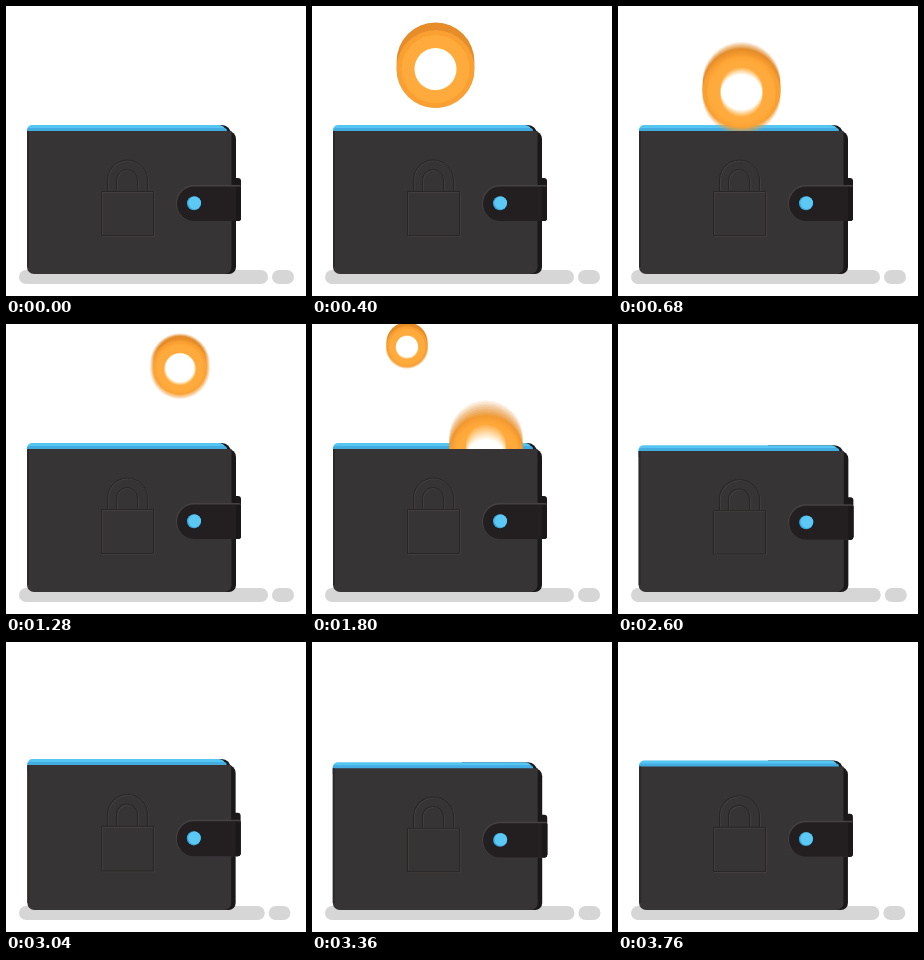
Recreate the animation shown at these times as an HTML page with a canvas. Size 300 by 290 pixels, loop 3.8 s.

```html
<!DOCTYPE html>
<html lang="en">
<head>
<meta charset="utf-8">
<title>Coins into wallet</title>
<style>
html, body { margin: 0; width: 100%; height: 100%; overflow: hidden; background: #fff; }
canvas { display: block; }
</style>
</head>
<body>
<canvas id="stage" width="300" height="290"></canvas>
<script>
const LOOP = 3800, STEP = 40;
const ctx = document.getElementById('stage').getContext('2d');
const layer = document.createElement('canvas');
layer.width = 300;
layer.height = 290;
const lctx = layer.getContext('2d');

// Each coin pops in at `start`, hovers at `y`, then drops `drop` px in `pace` ms after `fall`.
const coins = [
  { x: 123.5, y: 63, r: 39, start: 20, grow: 400, fall: 363, drop: 23, pace: 317 },
  { x: 174, y: 48, r: 37, start: 1060, grow: 400, fall: 1278, drop: 80, pace: 522 },
  { x: 95, y: 22, r: 21, start: 1620, grow: 200, fall: 1674, drop: 40, pace: 526 }
];
const impacts = [{ at: 1960, size: 6 }, { at: 2500, size: 3 }];

function coinPose(c, t) {
  const p = Math.min(1, Math.max(0, (t - c.start) / c.grow));
  const scale = Math.sin(p * Math.PI / 2);
  const fallen = c.drop * Math.pow(Math.max(0, t - c.fall) / c.pace, 2.5);
  return { r: c.r * scale, y: c.y - 15 * (1 - scale) + fallen };
}

function squash(t) {
  return impacts.reduce((sum, { at, size }) => {
    const d = t - at;
    return d < 0 ? sum : sum + size * Math.exp(-d / 640) * Math.sin(d / 640 * 2 * Math.PI);
  }, 0);
}

function disc(g, x, y, r, color) {
  g.beginPath();
  g.arc(x, y, r, 0, 2 * Math.PI);
  g.fillStyle = color;
  g.fill();
}

function box(x, y, w, h, radii, color) {
  ctx.beginPath();
  ctx.roundRect(x, y, w, h, radii);
  ctx.fillStyle = color;
  ctx.fill();
}

function coinShape(g, x, y, r) {
  const lift = r * 0.2;
  g.fillStyle = '#df8826';
  g.beginPath();
  g.arc(x, y - lift, r, Math.PI, 0);
  g.arc(x, y, r, 0, Math.PI);
  g.fill();
  disc(g, x, y, r, '#f59b2b');
  disc(g, x, y, r * 0.87, '#faa637');
  disc(g, x, y, r * 0.54, '#ffffff');
}

// Averages several poses around t for motion blur.
function drawCoin(c, t) {
  const samples = 10, exposure = 44;
  const now = coinPose(c, t);
  if (t < c.start || now.y - now.r * 1.2 > 150) return;
  lctx.clearRect(0, 0, 300, 290);
  for (let i = 0; i < samples; i++) {
    const pose = coinPose(c, t + exposure * ((i + 0.5) / samples - 0.5));
    if (pose.r <= 0) continue;
    blurCtx.clearRect(0, 0, 300, 290);
    coinShape(blurCtx, c.x, pose.y, pose.r);
    lctx.globalCompositeOperation = 'lighter';
    lctx.globalAlpha = 1 / samples;
    lctx.drawImage(blurCtx.canvas, 0, 0);
  }
  lctx.globalAlpha = 1;
  ctx.save();
  ctx.beginPath();
  ctx.rect(0, 0, 300, 150);
  ctx.clip();
  ctx.drawImage(layer, 0, 0);
  ctx.restore();
}
const blurCanvas = document.createElement('canvas');
blurCanvas.width = 300;
blurCanvas.height = 290;
const blurCtx = blurCanvas.getContext('2d');

function drawShadow(s) {
  const stretch = 1 + (s > 0 ? 0.4 : 1.7) * s / 275;
  box(13, 264, 249 * stretch, 14, 7, '#d7d6d7');
  box(13 + 253 * stretch, 264, 22 * stretch, 14, 7, '#d7d6d7');
}

function onWallet(s, draw) {
  ctx.save();
  ctx.translate(125, 268);
  ctx.scale(1 + s * 0.0016, 1 - s / 149);
  ctx.translate(-125, -268);
  draw();
  ctx.restore();
}

function drawBack() {
  box(150, 119, 75, 100, [0, 9, 0, 0], '#1b1819');
  box(150, 125, 80, 143, [0, 8, 7, 0], '#1b1819');
  box(226, 172, 9, 40, [3, 3, 0, 0], '#1b1819');
  box(21, 119, 199, 12, [5, 7, 0, 0], '#55c5f2');
  box(21, 122, 200, 9, [2, 3, 0, 0], '#43ade2');
}

function lockPath(dx, dy, color) {
  ctx.save();
  ctx.translate(dx, dy);
  ctx.strokeStyle = color;
  ctx.beginPath();
  ctx.rect(95.5, 185.5, 52, 44);
  ctx.moveTo(101.5, 185);
  ctx.lineTo(101.5, 174);
  ctx.arc(121.5, 174, 20, Math.PI, 0);
  ctx.lineTo(141.5, 185);
  ctx.moveTo(110.5, 185);
  ctx.lineTo(110.5, 174);
  ctx.arc(121, 174, 10.5, Math.PI, 0);
  ctx.lineTo(131.5, 185);
  ctx.stroke();
  ctx.restore();
}

function drawFront() {
  box(21, 125, 204.5, 143, [0, 0, 7, 7], '#373435');
  box(21, 125, 2, 136, 0, '#2c292a');
  ctx.lineWidth = 1;
  lockPath(0.8, 0.8, '#454243');
  lockPath(0, 0, '#292627');

  box(170, 179, 65, 36, [18, 2, 3, 18], '#464243');
  box(171, 180.5, 64, 34.5, [17, 1, 3, 17], '#231f20');
  box(230, 181, 5, 34, [0, 0, 3, 0], '#1b1819');
  disc(ctx, 188, 197.3, 7, '#3da9de');
  disc(ctx, 188.7, 196.9, 6.3, '#5cc9f5');
}

function render(t) {
  const s = squash(t);
  ctx.fillStyle = '#fff';
  ctx.fillRect(0, 0, 300, 290);
  drawShadow(s);
  onWallet(s, drawBack);
  coins.forEach(c => drawCoin(c, t));
  onWallet(s, drawFront);
}

const origin = performance.now();
function tick() {
  const elapsed = (performance.now() - origin) % LOOP;
  render(Math.floor(elapsed / STEP) * STEP);
  requestAnimationFrame(tick);
}
tick();
</script>
</body>
</html>
```
